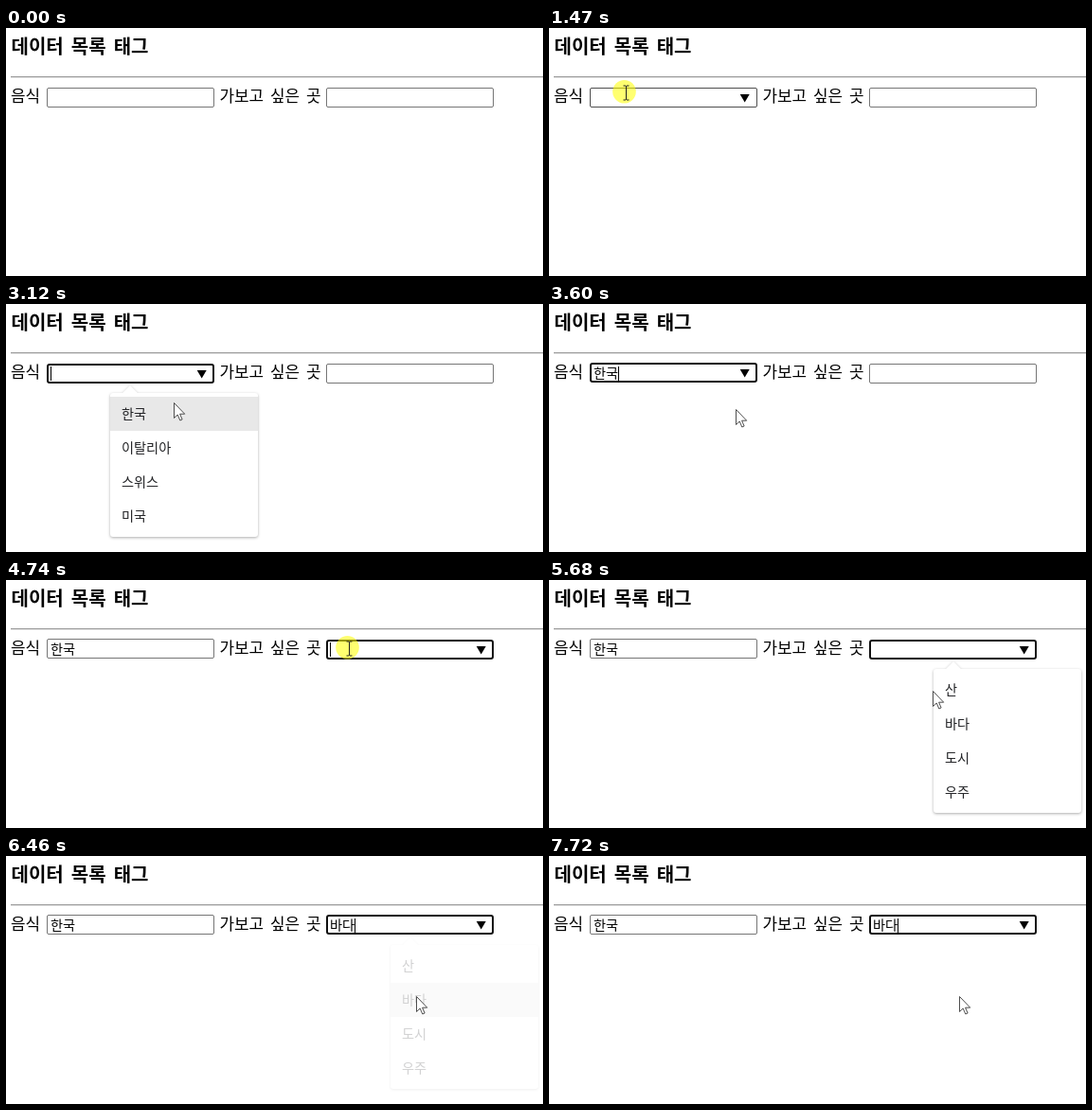
An HTML page for the animation above (7790 ms loop, 567 by 262 pixels).

```html
<!DOCTYPE html>
<html lang="ko">
<head>
<meta charset="utf-8">
<style>
  html, body { margin: 0; width: 100%; height: 100%; overflow: hidden; background: #fff; }
  svg { display: block; }
  text { font: 350 14.2px "Noto Sans CJK KR", "Noto Sans CJK JP", "Noto Sans CJK", sans-serif; }
  .label { font-size: 16.9px; word-spacing: 2.2px; }
  .heading { font-size: 20px; font-weight: 700; word-spacing: 2.5px; }
  .card { filter: drop-shadow(0 1px 1.5px rgba(0, 0, 0, .32)); }
</style>
</head>
<body>
<svg id="stage" width="567" height="262" viewBox="0 0 567 262">
  <text class="heading" x="5.5" y="27">데이터 목록 태그</text>
  <rect x="5" y="51" width="562" height="1" fill="#9a9a9a"/>
  <rect x="5" y="52" width="562" height="1" fill="#e4e4e4"/>
  <text class="label" x="5" y="78.2">음식</text>
  <text class="label" x="225.5" y="78.2">가보고 싶은 곳</text>
</svg>
<script>
const LOOP = 7790, TICK = 1000 / 15;
const stage = document.getElementById('stage');

function add(parent, tag, attrs = {}, text = '') {
  const node = document.createElementNS('http://www.w3.org/2000/svg', tag);
  for (const key in attrs) node.setAttribute(key, attrs[key]);
  node.textContent = text;
  parent.append(node);
  return node;
}
const show = (node, on) => node.setAttribute('visibility', on ? 'visible' : 'hidden');
const within = (t, spans) => spans.some(([from, to]) => t >= from && t < to);

function makeField(x, left, items, times) {
  const field = { x, left, ...times };
  field.border = add(stage, 'rect', { fill: '#fff' });
  field.value = add(stage, 'text', { x: x + 4, y: 77.8 }, items[times.pick]);
  field.arrow = add(stage, 'path', { d: `M${x + 158.7} 70h10l-5 8.6z` });
  field.caret = add(stage, 'rect', { y: 66, width: 1, height: 15 });

  field.popup = add(stage, 'g');
  add(field.popup, 'path', {
    class: 'card', fill: '#fff',
    d: `M${left + 3} 94h10l8-8 8 8h124q3 0 3 3v146q0 3-3 3h-150q-3 0-3-3v-146q0-3 3-3z`
  });
  field.row = add(field.popup, 'rect', { x: left, width: 156, height: 36, fill: '#e8e8e8' });
  items.forEach((item, i) =>
    add(field.popup, 'text', { x: left + 12, y: 121 + 36 * i, fill: '#202124' }, item));
  return field;
}

const fields = [
  makeField(43, 110, ['한국', '이탈리아', '스위스', '미국'], {
    pick: 0, focus: [1530, 4670], open: [1530, 1600], close: [3455, 3595], filled: 3455,
    blink: [[1530, 2065], [2595, 3125], [3455, 4060], [4595, 4670]]
  }),
  makeField(338, 406, ['산', '바다', '도시', '우주'], {
    pick: 1, focus: [4670, LOOP], open: [4795, 4865], close: [6390, 6525], filled: 6390,
    blink: [[4670, 5265], [5795, 6325], [6390, 6855], [7715, LOOP]]
  })
];

const halo = add(stage, 'circle', { r: 12.3, fill: '#ffff00', 'fill-opacity': .56 });
const beam = add(stage, 'path', {
  d: 'M-3-7.5h2.5l.5.6.5-.6h2.5M0-7v14M-3 7.5h2.5l.5-.6.5.6h2.5', fill: 'none', stroke: '#222'
});
const pointer = add(stage, 'path', {
  d: 'M.5.5v16l3.7-3.5 2.6 6 2.3-1-2.5-5.8h5.1z', fill: '#fff', stroke: '#3c3c3c', 'stroke-width': .9
});

// Mouse path as [time, x, y]
const path = [
  [865, -6, 78], [1265, 81, 68], [2735, 81, 68], [3185, 197, 111], [3865, 197, 111],
  [4455, 362, 72], [5200, 362, 72], [5560, 398, 108], [5930, 422, 140], [6000, 421, 137],
  [6060, 427, 143], [6180, 433, 148], [LOOP, 433, 148]
];
const clicks = [[1465, 1595], [3385, 3525], [4595, 4935], [6325, 6455]];

function mouseAt(time) {
  const t = Math.floor((time + 8) / TICK) * TICK;
  const next = path.findIndex(p => p[0] > t);
  if (next <= 0) return { x: -30, y: 78 };
  const [t0, x0, y0] = path[next - 1], [t1, x1, y1] = path[next];
  let u = (t - t0) / (t1 - t0);
  if (t < 5200) u = u * u * (3 - 2 * u);
  return { x: x0 + (x1 - x0) * u, y: y0 + (y1 - y0) * u };
}

function popupOpacity({ open, close }, t) {
  if (t < open[0] || t >= close[1]) return 0;
  if (t < open[1]) return .5;
  if (t < close[0]) return 1;
  return t < close[0] + TICK ? .6 : .2;
}

function drawField(field, t, mouse) {
  const { x, left } = field;
  const focused = within(t, [field.focus]);
  const filled = t >= field.filled;
  const top = filled ? 62 : 63; // a chosen value lifts the box by one pixel
  const hovered = mouse.x >= x && mouse.x < x + 177 && mouse.y >= top && mouse.y < top + 21;
  const line = focused ? 2 : 1;
  const frame = {
    x: x + line / 2, y: top + line / 2, width: 177 - line, height: 21 - line, rx: 1 + line / 2,
    stroke: focused ? '#101010' : hovered ? '#4f4f4f' : '#767676', 'stroke-width': line
  };
  for (const key in frame) field.border.setAttribute(key, frame[key]);

  show(field.value, filled);
  show(field.arrow, focused || hovered);
  field.arrow.setAttribute('transform', `translate(0 ${top - 63})`);
  field.caret.setAttribute('x', x + (filled ? 30 : 4));
  show(field.caret, within(t, field.blink));

  const opacity = popupOpacity(field, t);
  field.popup.setAttribute('opacity', opacity);
  const row = Math.floor((mouse.y - 98) / 36);
  const inside = mouse.x >= left && mouse.x < left + 156 && row >= 0 && row < 4;
  show(field.row, opacity > 0 && inside);
  if (inside) field.row.setAttribute('y', 98 + 36 * row);
}

function draw(t) {
  const mouse = mouseAt(t);
  fields.forEach(field => drawField(field, t, mouse));
  const overText = mouse.y < 84;
  const place = `translate(${Math.round(mouse.x)} ${Math.round(mouse.y)})`;
  beam.setAttribute('transform', place + ' translate(.5 .5)');
  pointer.setAttribute('transform', place);
  show(beam, overText);
  show(pointer, !overText);
  halo.setAttribute('cx', mouse.x - 1.5);
  halo.setAttribute('cy', mouse.y - .8);
  show(halo, within(t, clicks));
}

const start = performance.now();
function tick() {
  draw((performance.now() - start) % LOOP);
  requestAnimationFrame(tick);
}
tick();
</script>
</body>
</html>
```
